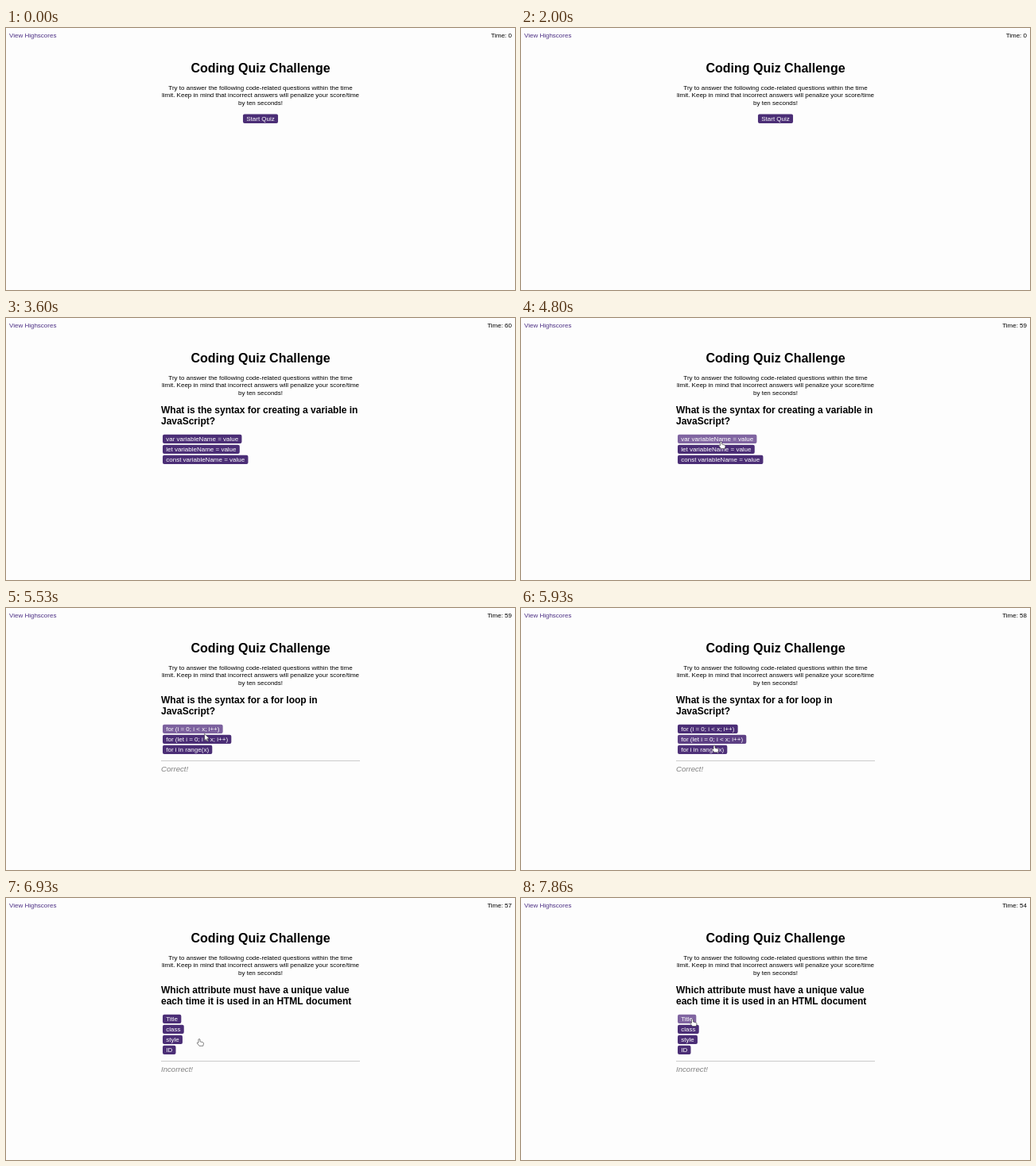
These frames come from a looping animation (640 by 330 pixels, 8 s). An HTML page with a canvas:

```html
<!DOCTYPE html>
<html lang="en">
<head>
<meta charset="utf-8">
<title>Coding Quiz Challenge</title>
<style>
  html, body { margin: 0; width: 100%; height: 100%; overflow: hidden; background: #fdfdfd; }
  canvas { display: block; width: 640px; height: 330px; }
</style>
</head>
<body>
<canvas id="stage"></canvas>
<script>
const LOOP = 8000, STEP = 1000 / 15, FADE = 150;
const SANS = '"Liberation Sans", Arial, sans-serif';
const BASE = [75, 46, 118], HOVER = [128, 101, 161];

const canvas = document.getElementById('stage');
const ctx = canvas.getContext('2d');
const dpr = window.devicePixelRatio || 1;
canvas.width = 640 * dpr;
canvas.height = 330 * dpr;

const INTRO = [
  'Try to answer the following code-related questions within the time',
  'limit. Keep in mind that incorrect answers will penalize your score/time',
  'by ten seconds!'
];

const SCREENS = [
  { from: 0, start: true, options: ['Start Quiz'] },
  { from: 3600, title: ['What is the syntax for creating a variable in', 'JavaScript?'],
    options: ['var variableName = value', 'let variableName = value', 'const variableName = value'] },
  { from: 5130, title: ['What is the syntax for a for loop in', 'JavaScript?'],
    options: ['for (i = 0; i < x; i++)', 'for (let i = 0; i < x; i++)', 'for i in range(x)'],
    result: 'Correct!' },
  { from: 6930, title: ['Which attribute must have a unique value', 'each time it is used in an HTML document'],
    options: ['Title', 'class', 'style', 'ID'],
    result: 'Incorrect!' }
];

// Pointer tip: [time, x, y]
const PATH = [
  [2400, 338, 143], [2700, 331, 130], [3000, 323, 116], [3200, 320, 114],
  [4000, 312, 156], [4060, 310, 158], [4400, 310, 158], [4500, 275, 174],
  [4600, 258, 165], [4650, 254, 157.5], [4800, 251.5, 155.5],
  [5460, 251.5, 155.5], [5600, 248, 161], [5830, 244, 171], [5930, 243, 172.8],
  [6330, 243, 173], [6660, 243, 177.3],
  [7260, 243, 177.3], [7400, 238, 184], [7600, 226, 175], [7700, 218.5, 157], [7860, 215.5, 152.5]
];

const HAND = new Path2D('M-2 1.5Q0-1 2 1.5V7L9 9Q11 9.5 11 12L9.5 18H0L-5.5 11Q-5 8-2 10Z');
const ARROW = new Path2D('M0 0V17L4 13.4L6.6 19.4L9.2 18.2L6.6 12.4H12Z');

function pointerAt(t) {
  if (t < PATH[0][0] || (t >= 3600 && t < 4000)) return null;
  const i = PATH.findIndex(p => p[0] > t);
  if (i < 0) return PATH[PATH.length - 1].slice(1);
  const [t0, x0, y0] = PATH[i - 1], [t1, x1, y1] = PATH[i];
  const k = (t - t0) / (t1 - t0);
  return [x0 + (x1 - x0) * k, y0 + (y1 - y0) * k];
}

// Text is set at twice its size and halved to keep its natural spacing
function setFont(size, style = '') {
  ctx.font = `${style} ${size * 2}px ${SANS}`;
}

function text(str, x, y, size, color, align = 'left', style = '') {
  ctx.save();
  ctx.translate(x, y);
  ctx.scale(0.5, 0.5);
  setFont(size, style);
  ctx.textAlign = align;
  ctx.fillStyle = color;
  ctx.fillText(str, 0, 0);
  ctx.restore();
}

function layout(screen) {
  setFont(8);
  return screen.options.map((label, i) => {
    const w = ctx.measureText(label).width / 2 + 8.5;
    return {
      label, w, h: 11.4,
      x: screen.start ? 320 - w / 2 : 197,
      y: screen.start ? 108.6 : 146.7 + 13 * i
    };
  });
}

function hit(b, p) {
  return p && p[0] >= b.x && p[0] <= b.x + b.w && p[1] >= b.y && p[1] <= b.y + b.h;
}

// Hover fade: share of the last FADE ms spent over the button
function glow(b, t) {
  const n = 15;
  let sum = 0;
  for (let i = 0; i < n; i++) if (hit(b, pointerAt(t - i * FADE / n))) sum++;
  return sum / n;
}

function button(b, t) {
  const k = glow(b, t);
  ctx.fillStyle = `rgb(${BASE.map((c, i) => Math.round(c + (HOVER[i] - c) * k))})`;
  ctx.beginPath();
  ctx.roundRect(b.x, b.y, b.w, b.h, 2);
  ctx.fill();
  text(b.label, b.x + 4.25, b.y + 8.4, 8, '#fff');
}

function pointer(p, hand) {
  ctx.save();
  ctx.translate(p[0], p[1]);
  ctx.scale(0.5, 0.5);
  const shape = hand ? HAND : ARROW;
  ctx.fillStyle = '#fff';
  ctx.strokeStyle = '#333';
  ctx.lineWidth = 1.2;
  ctx.fill(shape);
  ctx.stroke(shape);
  ctx.restore();
}

function secondsLeft(t) {
  if (t < 3600) return 0;
  return 60 - Math.floor((t - 3600 + 0.01) / 1000) - (t >= 7599 ? 2 : 0);
}

function draw(t) {
  const screen = SCREENS.filter(s => t + 0.01 >= s.from).pop();
  const buttons = layout(screen);

  ctx.setTransform(dpr, 0, 0, dpr, 0, 0);
  ctx.fillStyle = '#fdfdfd';
  ctx.fillRect(0, 0, 640, 330);

  text('View Highscores', 4, 11.6, 8, '#4b2e83');
  text('Time: ' + secondsLeft(t), 636, 11.6, 8, '#000', 'right');
  text('Coding Quiz Challenge', 320, 56.2, 16, '#000', 'center', 'bold');
  INTRO.forEach((line, i) => text(line, 320, 78.1 + 9.25 * i, 8, '#000', 'center'));
  (screen.title || []).forEach((line, i) =>
    text(line, 195, 119.6 + 14 * i, 12, '#000', 'left', 'bold'));

  buttons.forEach(b => button(b, t));

  if (screen.result) {
    const y = 153 + 13 * buttons.length;
    ctx.fillStyle = '#cbcbcb';
    ctx.fillRect(195, y, 250, 1);
    text(screen.result, 195, y + 13.7, 9.6, '#808080', 'left', 'italic');
  }

  const p = pointerAt(t);
  // The hand stays after a click until the pointer moves again
  const held = t >= 6930 && t < 7260;
  if (p) pointer(p, held || buttons.some(b => hit(b, p)));
}

function tick() {
  const t = performance.now() % LOOP;
  draw(Math.floor((t + 7) / STEP) * STEP % LOOP);
  requestAnimationFrame(tick);
}
tick();
</script>
</body>
</html>
```
